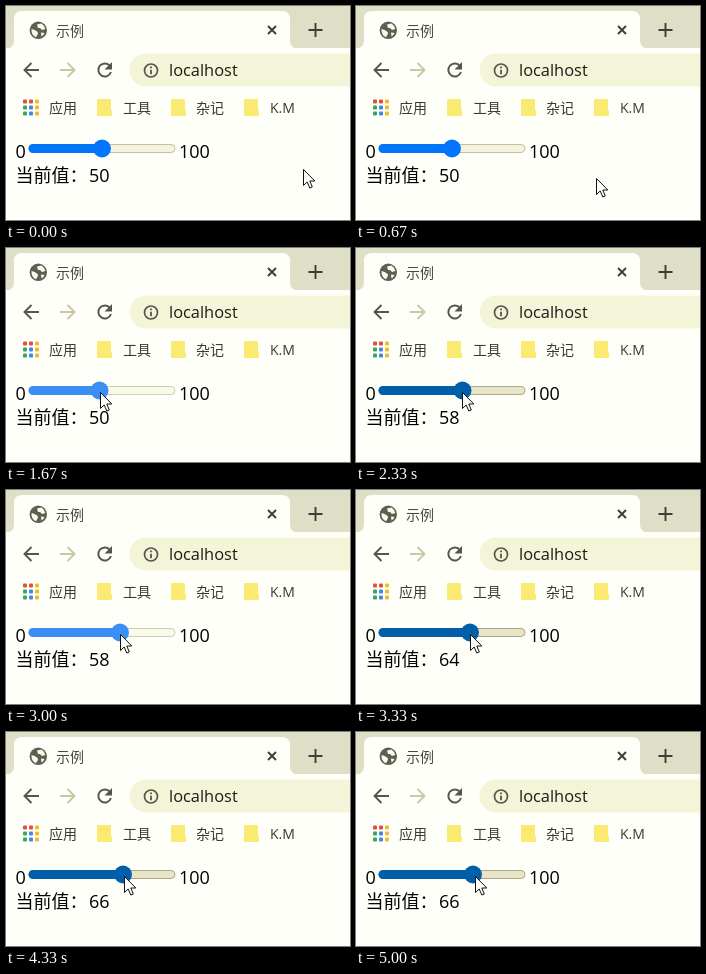
An HTML page for the animation above (5330 ms loop, 344 by 214 pixels).

```html
<!DOCTYPE html>
<html lang="zh-CN">
<head>
<meta charset="utf-8">
<title>示例</title>
<style>
html, body { margin: 0; width: 100%; height: 100%; overflow: hidden; background: #fffffa; }
svg { display: block; width: 344px; height: 214px; }
text { font-family: "Open Sans", "Noto Sans CJK SC", "Noto Sans CJK", sans-serif; white-space: pre; }
.tab { font-size: 14px; fill: #49493a; }
.mark { font-size: 14px; fill: #3a3a2e; }
.page { font-size: 18px; fill: #000; }
.line { fill: none; stroke: #56564a; stroke-width: 1.9; }
</style>
</head>
<body>
<svg viewBox="0 0 344 214">
  <defs>
    <path id="folder" d="M1 0H13Q14 0 14 1V11L15 12V16Q15 17 14 17H1Q0 17 0 16V1Q0 0 1 0Z" fill="#fbea72"/>
    <clipPath id="filled"><rect id="fillClip" x="20" y="136" width="76" height="14"/></clipPath>
  </defs>

  <rect width="344" height="43" fill="#dfdec6"/>
  <path d="M0 43Q8 42 8 34V13Q8 5 16 5H276Q284 5 284 13V34Q284 42 292 43Z" fill="#fffffa"/>
  <rect y="42" width="344" height="172" fill="#fffffa"/>

  <circle cx="32.3" cy="24.3" r="8.7" fill="#5d5f50"/>
  <path d="M25.5 23Q29 23.5 31 25.5Q33 27 31 29.5L30 31.3Q25 29 25.5 23ZM31 18.5L35.5 17.5Q39 20 39.3 23L36 24L34 22L32 22ZM35 26.5L38.5 27Q37.5 29.5 35.5 30.5Z" fill="#f9f9ee"/>
  <text class="tab" x="50" y="29.5">示例</text>
  <path class="line" d="M262 20L270 28M270 20L262 28" style="stroke:#3e3e36"/>
  <path class="line" d="M302.5 24H316.5M309.5 17V31" style="stroke:#3e3e36"/>

  <path class="line" d="M33 64H19M25.5 57L18.5 64L25.5 71"/>
  <path class="line" d="M54 64H68M61.5 57L68.5 64L61.5 71" style="stroke:#c9c8a2"/>
  <path class="line" d="M104 60A6.5 6.5 0 1 0 105 66"/>
  <path d="M106 56V63.5H98.5Z" fill="#56564a"/>
  <path d="M344 47.5H140A16.5 16.5 0 0 0 140 80.5H344Z" fill="#f4f4d9"/>
  <circle class="line" cx="145" cy="64.5" r="6.5" style="stroke-width:1.7"/>
  <path class="line" d="M145 60.5V62.2M145 63.8V68.3" style="stroke-width:1.8"/>
  <text x="163" y="70" font-size="16.4" fill="#1c1c16">localhost</text>

  <g id="apps"></g>
  <text class="mark" x="43" y="107">应用</text>
  <use href="#folder" x="91" y="93"/>
  <text class="mark" x="117" y="107">工具</text>
  <use href="#folder" x="165" y="93"/>
  <text class="mark" x="190" y="107">杂记</text>
  <use href="#folder" x="238" y="93"/>
  <text class="mark" x="264" y="107">K.M</text>

  <text class="page" x="9.5" y="152">0</text>
  <text class="page" x="173" y="152">100</text>
  <rect id="track" x="23" y="138.5" width="146" height="8" rx="4"/>
  <rect id="fill" x="22.5" y="138" width="147" height="9" rx="4.5" clip-path="url(#filled)"/>
  <circle id="knob" cy="142.5" r="9"/>
  <text class="page" x="9.5" y="176">当前值：</text>
  <text class="page" id="value" x="83" y="176"></text>
  <path id="cursor" d="M.5 .5V16.5L4.2 13L6.8 19L9.3 18L6.8 12H11.8Z" fill="#fffffc" stroke="#111"/>
</svg>
<script>
const LOOP = 5330;
const $ = id => document.getElementById(id);

// fill, knob, empty track, track border
const looks = {
  idle:  ["#0075f8", "#0075ff", "#f4f3de", "#c2c0a4"],
  track: ["#005fa8", "#0075ff", "#e8e5c6", "#aaa68a"],
  hover: ["#005fa8", "#005fa8", "#e8e5c6", "#aaa68a"],
  press: ["#3a8ef6", "#3a8ef6", "#fafaea", "#d0ceb2"]
};

// time, cursor x, cursor y, knob x, value, look
const steps = [
  [0, 297, 163, 96, 50, "idle"],
  [670, 240, 172, 96, 50, "idle"],
  [1000, 148, 152, 96, 50, "track"],
  [1330, 94, 144, 96, 50, "hover"],
  [1670, 94, 144, 93.5, 50, "press"],
  [2000, 106, 144, 106.5, 50, "press"],
  [2330, 106, 144, 106.5, 58, "hover"],
  [2670, 106, 144, 106.5, 58, "press"],
  [3000, 114, 144, 114, 58, "press"],
  [3330, 114, 144, 114, 64, "hover"],
  [3670, 114, 144, 114, 64, "press"],
  [4000, 118, 144, 117, 64, "press"],
  [4330, 118, 144, 117, 66, "hover"],
  [4670, 119, 144, 117, 66, "hover"]
];

const dots = ["#e0503c", "#e0503c", "#f0bd28", "#36a65a", "#4285ee", "#f0bd28", "#36a65a", "#4285ee", "#f0bd28"];
$("apps").innerHTML = dots.map((color, i) =>
  `<rect x="${17 + i % 3 * 6}" y="${93.5 + Math.floor(i / 3) * 6}" width="4" height="4" rx="1" fill="${color}"/>`
).join("");

let shown;
function draw(now) {
  const t = now % LOOP;
  const step = steps.findLast(s => s[0] <= t);
  if (step !== shown) {
    shown = step;
    const [, x, y, knobX, value, look] = step;
    const [fill, knob, empty, border] = looks[look];
    $("cursor").setAttribute("transform", `translate(${x} ${y})`);
    $("knob").setAttribute("cx", knobX);
    $("knob").setAttribute("fill", knob);
    $("fillClip").setAttribute("width", knobX - 20);
    $("fill").setAttribute("fill", fill);
    $("track").setAttribute("fill", empty);
    $("track").setAttribute("stroke", border);
    $("value").textContent = value;
  }
}

const start = performance.now();
function tick() {
  draw(performance.now() - start);
  requestAnimationFrame(tick);
}
tick();
</script>
</body>
</html>
```
